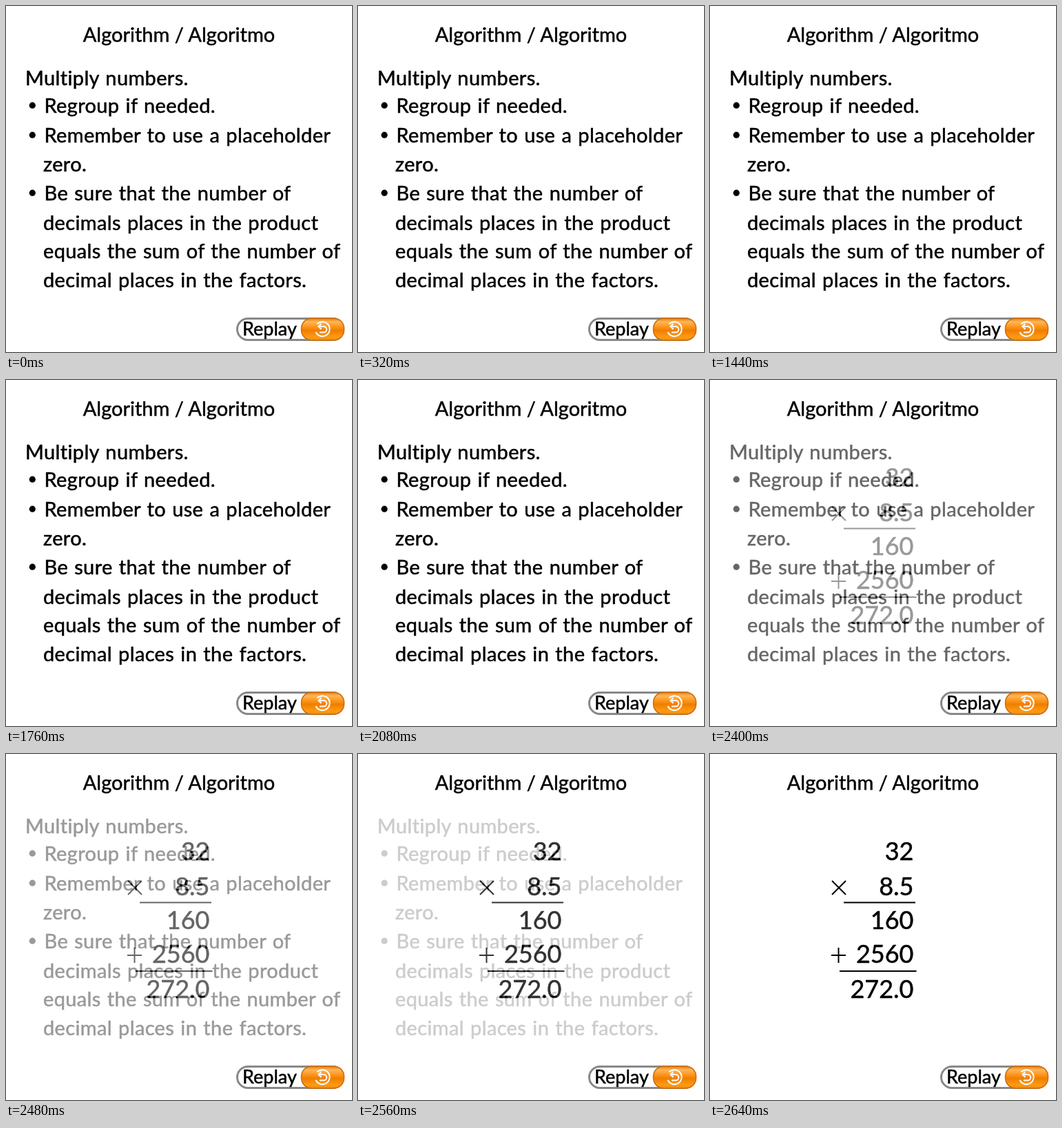
Recreate the animation shown at these times as an HTML page. Size 502 by 502 pixels, loop 4560 ms.

```html
<!DOCTYPE html>
<html lang="en">
<head>
<meta charset="utf-8">
<title>Multiplication algorithm</title>
<style>
  html, body { margin: 0; width: 100%; height: 100%; overflow: hidden; background: #fff; }
  svg { display: block; width: 502px; height: 502px; }
  text { font: 29px Lato, "Open Sans", sans-serif; stroke: #000; stroke-width: .5px; stroke-linejoin: round; }
  .rules text { letter-spacing: .35px; word-spacing: 1.4px; }
  .sum text { font-size: 36px; text-anchor: end; }
  .sum path { fill: none; stroke: #000; stroke-width: 2px; }
  .sum { animation: reveal 4560ms infinite; }
  .button text { font-size: 27px; }

  /* five 80 ms steps of a cross-fade */
  @keyframes reveal {
    0% { opacity: 0; }
    49.12% { opacity: 0; animation-timing-function: steps(5, end); }
    57.89%, 100% { opacity: 1; }
  }
</style>
</head>
<body>
<svg viewBox="0 0 502 502">
  <defs>
    <linearGradient id="orange" x2="0" y2="1">
      <stop offset="0" stop-color="#e07a08"/>
      <stop offset=".16" stop-color="#ffb658"/>
      <stop offset=".42" stop-color="#fb9116"/>
      <stop offset=".55" stop-color="#ef7e00"/>
      <stop offset=".85" stop-color="#ff9a14"/>
      <stop offset="1" stop-color="#f08c10"/>
    </linearGradient>
  </defs>

  <text x="251" y="52" text-anchor="middle">Algorithm / Algoritmo</text>

  <g class="rules">
    <text x="28" y="115">Multiply numbers.</text>
    <circle cx="38.3" cy="144.2" r="4.6"/>
    <text x="55.5" y="155">Regroup if needed.</text>
    <circle cx="38.3" cy="187.2" r="4.6"/>
    <text x="55.5" y="198">Remember to use a placeholder</text>
    <text x="54" y="240">zero.</text>
    <circle cx="38.3" cy="271.2" r="4.6"/>
    <text x="55.5" y="282">Be sure that the number of</text>
    <text x="54" y="324.5">decimals places in the product</text>
    <text x="54" y="365.5">equals the sum of the number of</text>
    <text x="54" y="407.5">decimal places in the factors.</text>
  </g>

  <g class="sum">
    <rect y="85" width="502" height="340" fill="#fff"/>
    <text x="295.5" y="153.5">32</text>
    <text x="295.5" y="205">8.5</text>
    <text x="295.5" y="254">160</text>
    <text x="295.5" y="303">2560</text>
    <text x="295.5" y="354">272.0</text>
    <path d="M177 184l20 20m0-20l-20 20M176 292h21m-10.5-11v22M194 215.5h104M188 315h111.5"/>
  </g>

  <g class="button">
    <rect x="335.5" y="453.5" width="154" height="31" rx="15.5" fill="#fff" stroke="#888" stroke-width="3"/>
    <rect x="428.5" y="453" width="62" height="32" rx="15" fill="url(#orange)" stroke="#cf6c06" stroke-width="1.5"/>
    <text x="343" y="477.5">Replay</text>
    <g fill="none" stroke="#fff" stroke-width="2">
      <path d="M451.5 461.5A10.5 10.5 0 1 1 449.5 473"/>
      <path d="M453.5 465h7.5a4.3 4.3 0 0 1 0 8.6h-6M457.5 461l-4 4 4 4"/>
    </g>
  </g>
</svg>
</body>
</html>
```
